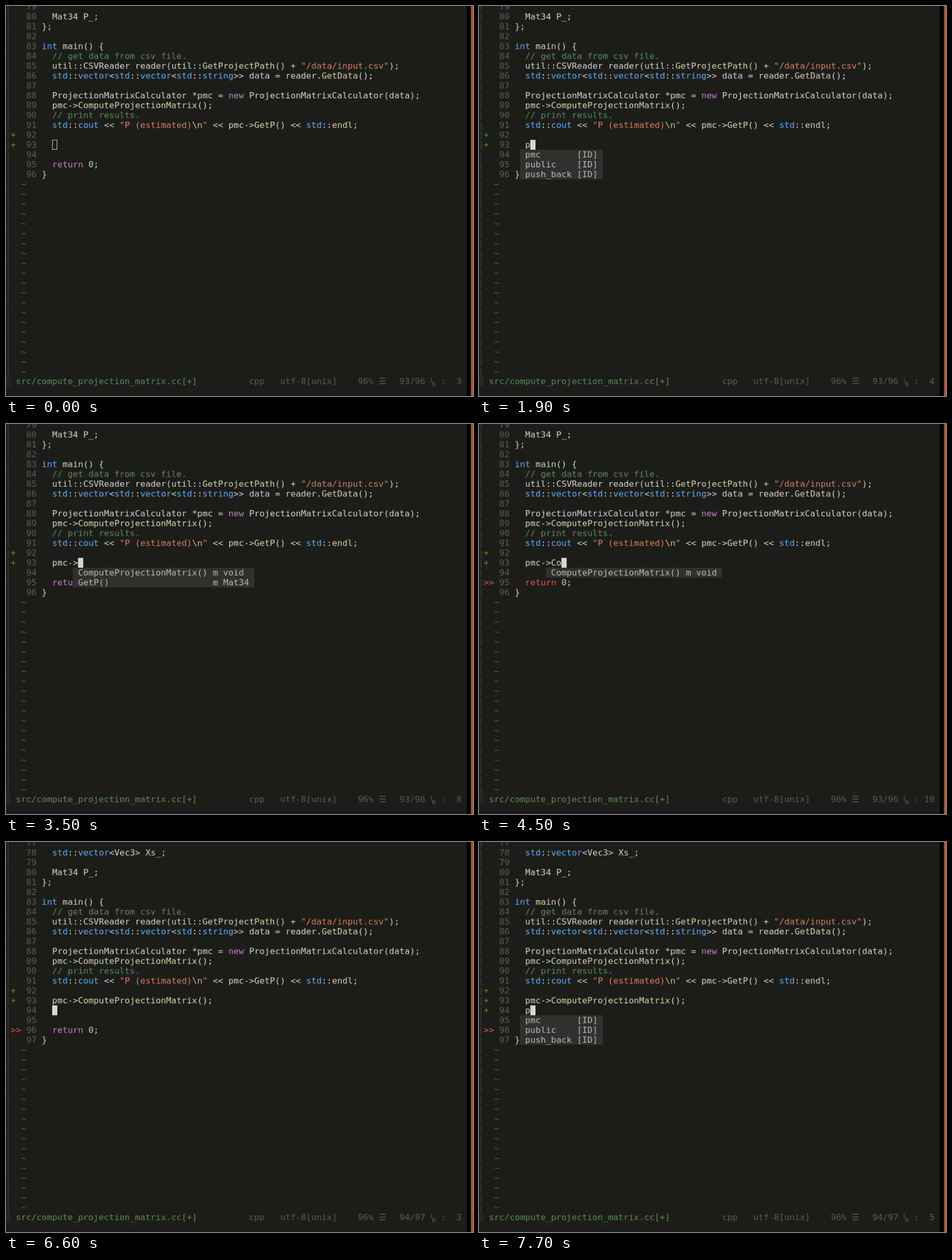
Recreate the animation shown at these times as an HTML page with a canvas. Size 819 by 684 pixels, loop 8000 ms.

```html
<!DOCTYPE html>
<html lang="en">
<head>
<meta charset="utf-8">
<title>Code completion</title>
<style>
html, body { margin: 0; width: 100%; height: 100%; overflow: hidden; background: #1c1d19; }
#stage { position: relative; width: 819px; height: 684px; overflow: hidden; }
canvas { position: absolute; left: 0; top: 0; width: 819.09px; height: 684.55px; }
</style>
</head>
<body>
<div id="stage"><canvas id="screen" width="901" height="753"></canvas></div>
<script>
// The terminal is drawn on its own 10 x 19 cell grid and shown at 10/11 size.
const LOOP = 8000, CELL_W = 10, CELL_H = 19, LEFT = -1, TOP = -8, BASELINE = 15;
const ROWS = 38, STATUS_ROW = 38, CODE_COL = 7;
const canvas = document.getElementById('screen');
const ctx = canvas.getContext('2d');

const colors = {
  back: '#1c1d19', plain: '#d7d7d5', dim: '#5c5c5c', bar: '#484848', add: '#4fa01c',
  err: '#ee5555', comment: '#5f8a5f', str: '#d7835f', esc: '#d7c08f', type: '#5fafff',
  key: '#c882d0', num: '#afd7af', func: '#d7d7af', menu: '#30302e', menuText: '#bcbcbc',
  picked: '#005f80', cursor: '#d8d8d2', corner: '#262626', foot: '#1b191b',
  edge: '#000', side: '#b5522f'
};

const code = {
  78: '  std::vector<Vec3> Xs_;',
  80: '  Mat34 P_;',
  81: '};',
  83: 'int main() {',
  84: '  // get data from csv file.',
  85: '  util::CSVReader reader(util::GetProjectPath() + "/data/input.csv");',
  86: '  std::vector<std::vector<std::string>> data = reader.GetData();',
  88: '  ProjectionMatrixCalculator *pmc = new ProjectionMatrixCalculator(data);',
  89: '  pmc->ComputeProjectionMatrix();',
  90: '  // print results.',
  91: '  std::cout << "P (estimated)\\n" << pmc->GetP() << std::endl;'
};

const ids = text => text.split(' ').map(name => [name, '[ID]']);
const compute = ['ComputeProjectionMatrix()', 'm void'];
const menus = {
  a: ids('A a1 a2 Ap and alias_types data last main make'),
  p: ids('pmc public push_back'),
  po: ids('ProjectionMatrixCalculator ComputeProjectionMatrix GetProjectPath push_back input compute'),
  pm: ids('ProjectionMatrixCalculator pmc ComputeProjectionMatrix'),
  pmc: ids('pmc ProjectionMatrixCalculator'),
  members: [compute, ['GetP()', 'm Mat34']],
  compute: [compute]
};

const call = 'pmc->ComputeProjectionMatrix';
const scrolled = { first: 77, error: true };
const nextLine = { ...scrolled, done: call + '();' };

// Each step holds from its time until the next one; pos is the status column.
const steps = [
  { at: 0, typed: '', pos: 3, hollow: true },
  { at: 100, typed: '', pos: 3 },
  { at: 1000, typed: 'a', pos: 4, menu: 'a' },
  { at: 1300, typed: '', pos: 3 },
  { at: 1900, typed: 'p', pos: 4, menu: 'p' },
  { at: 2000, typed: 'po', pos: 5, menu: 'po' },
  { at: 2300, typed: 'pm', pos: 5, menu: 'pm' },
  { at: 2800, typed: 'pmc', pos: 6, menu: 'pmc' },
  { at: 3000, typed: 'pmc-', pos: 7 },
  { at: 3500, typed: 'pmc->', pos: 8, menu: 'members' },
  { at: 4000, typed: 'pmc->C', pos: 9, menu: 'compute' },
  { at: 4500, typed: 'pmc->Co', pos: 10, menu: 'compute', error: true },
  { at: 5100, typed: call, pos: 8, menu: 'compute', picked: true, ...scrolled },
  { at: 5600, typed: call + '(', cursorAt: call.length, pos: 31, ...scrolled },
  { at: 6000, typed: call + '();', pos: 34, ...scrolled },
  { at: 6600, typed: '', pos: 3, ...nextLine },
  { at: 7200, typed: 'p', pos: 4, menu: 'p', ...nextLine },
  { at: 7300, typed: 'po', pos: 5, menu: 'po', ...nextLine },
  { at: 7700, typed: 'p', pos: 5, menu: 'p', ...nextLine }
];

const cellX = col => LEFT + col * CELL_W;
const cellY = row => TOP + row * CELL_H;

function box(col, row, width, color) {
  ctx.fillStyle = colors[color];
  ctx.fillRect(cellX(col), cellY(row), width * CELL_W, CELL_H);
}

function put(col, row, text, color = 'dim') {
  ctx.fillStyle = colors[color];
  ctx.fillText(text, cellX(col), cellY(row) + BASELINE);
}

const tokens = new RegExp([
  '(?<comment>//.*)',
  '(?<str>"[^"]*")',
  '(?<key>\\b(?:new|return)\\b)',
  '(?<type>\\b(?:int|std|vector|string|cout)\\b)',
  '(?<func>(?<=->|\\.|::|int )\\w+(?=\\()|\\bendl\\b)',
  '(?<num>\\b\\d+\\b)',
  '(?<plain>\\w+|[^\\w"/]+|.)'
].join('|'), 'g');

function highlight(line) {
  return [...line.matchAll(tokens)].flatMap(({ groups }) => {
    const [kind, text] = Object.entries(groups).find(([, value]) => value !== undefined);
    if (kind !== 'str') return [[kind, text]];
    return text.split(/(\\n)/).map((part, i) => [i % 2 ? 'esc' : 'str', part]);
  });
}

function drawCode(row, line, wrong) {
  let col = CODE_COL;
  for (const [kind, text] of highlight(line)) {
    put(col, row, text, wrong && kind === 'key' ? 'err' : kind);
    col += text.length;
  }
}

function drawMenu(items, col, row, picked) {
  const [nameWidth, kindWidth] = [0, 1].map(i => Math.max(...items.map(item => item[i].length)));
  items.forEach(([name, kind], i) => {
    box(col, row + i, nameWidth + kindWidth + 3, picked ? 'picked' : 'menu');
    put(col + 1, row + i, name, 'menuText');
    put(col + 2 + nameWidth, row + i, kind, 'menuText');
  });
}

function drawCursor(col, row, hollow) {
  if (!hollow) return box(col, row, 1, 'cursor');
  ctx.strokeStyle = colors.cursor;
  ctx.strokeRect(cellX(col) + 0.5, cellY(row) + 0.5, CELL_W - 1, CELL_H - 1);
}

function drawStatus(line, last, pos) {
  box(0, STATUS_ROW, 1, 'corner');
  put(2, STATUS_ROW, 'src/compute_projection_matrix.cc[+]', 'comment');
  put(47, STATUS_ROW, 'cpp');
  put(53, STATUS_ROW, 'utf-8[unix]');
  put(68, STATUS_ROW, '96% ☰');
  put(76, STATUS_ROW, `${line}/${last}`);
  put(84, STATUS_ROW, ':' + String(pos).padStart(3));
  ctx.strokeStyle = colors.dim;
  ctx.stroke(new Path2D('M820.5 716v9h4M823.5 733v-8l4 8v-8'));
}

function drawFrame() {
  const { width, height } = canvas;
  const fill = (color, x, y) => {
    ctx.fillStyle = colors[color];
    ctx.fillRect(x, y, width, height);
  };
  fill('foot', 0, 746);
  fill('edge', 889, 0);
  fill('side', 897, 0);
}

function draw(step) {
  const { typed, first = 79, done, error } = step;
  const edit = done ? 94 : 93, last = edit + 3;
  const lines = { ...code, [last - 1]: '  return 0;', [last]: '}' };
  if (done) lines[93] = '  ' + done;
  lines[edit] = '  ' + typed;

  ctx.fillStyle = colors.back;
  ctx.fillRect(0, 0, canvas.width, canvas.height);
  ctx.font = '16.6px "DejaVu Sans Mono", monospace';

  for (let row = 0; row < ROWS; row++) {
    const n = first + row;
    put(0, row, '|', 'bar');
    if (n > last) {
      put(3, row, '~');
      continue;
    }
    put(4, row, String(n));
    drawCode(row, lines[n] || '', error && !done && n === last - 1);
    if (n === 92 || n === 93 || (n === edit && typed)) put(1, row, '+', 'add');
    if (error && n === last - 1) put(1, row, '>>', 'err');
  }

  const row = edit - first, col = CODE_COL + 2;
  drawCursor(col + (step.cursorAt ?? typed.length), row, step.hollow);
  if (step.menu) {
    const start = typed.includes('>') ? col + 4 : col - 1;
    drawMenu(menus[step.menu], start, row + 1, step.picked);
  }
  drawStatus(edit, last, step.pos);
  drawFrame();
}

let shown;
const began = performance.now();
function tick() {
  const t = (performance.now() - began) % LOOP;
  const step = steps.findLast(s => s.at <= t);
  if (step !== shown) draw(shown = step);
  requestAnimationFrame(tick);
}
tick();
</script>
</body>
</html>
```
